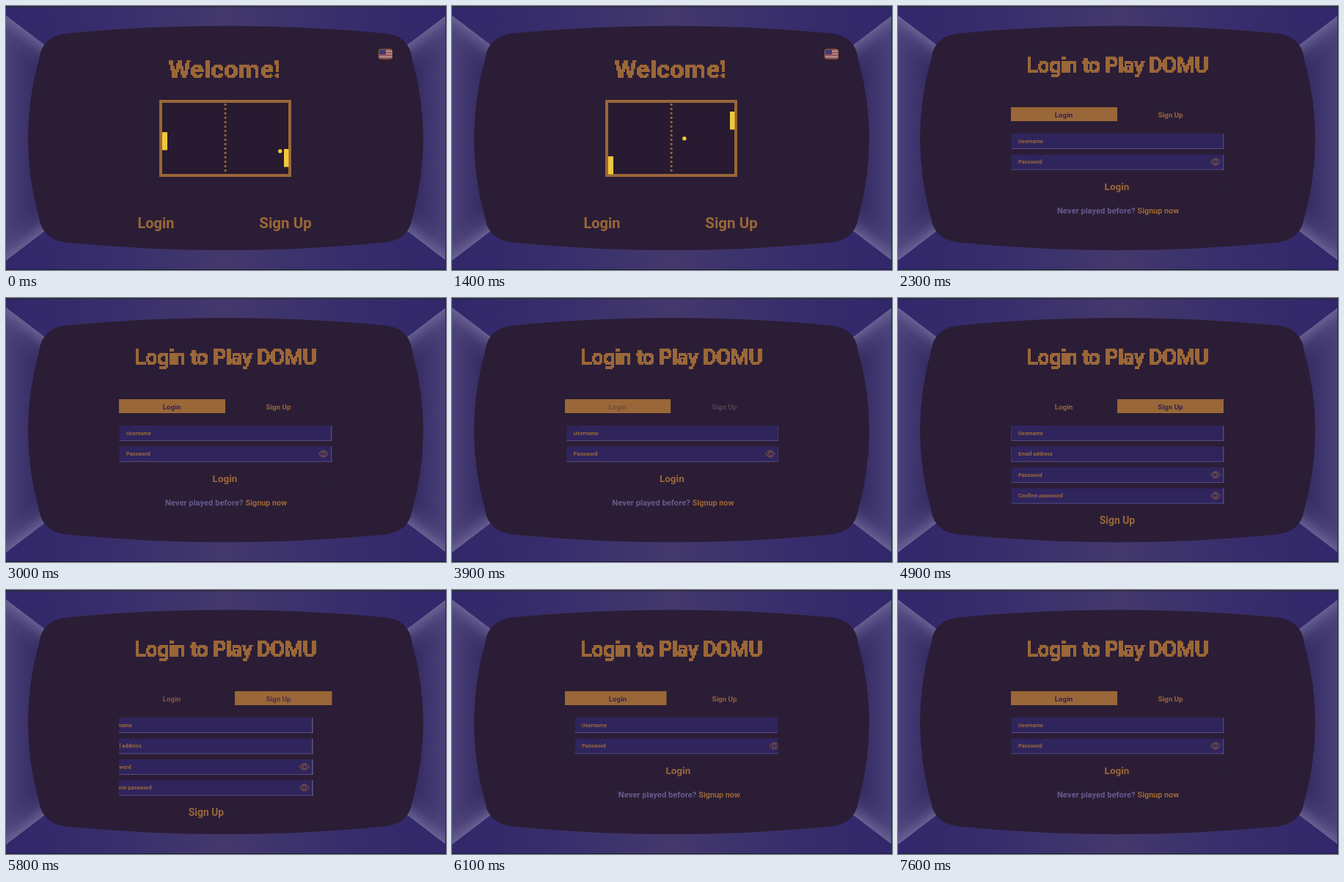
An HTML page with a canvas that plays this animation: 600 px wide and 360 px high, repeating every 7800 ms.

```html
<!DOCTYPE html>
<html lang="en">
<head>
<meta charset="utf-8">
<title>Arcade login</title>
<style>
  html, body { margin: 0; width: 100%; height: 100%; overflow: hidden; background: #2b1d35; }
  canvas { display: block; }
</style>
</head>
<body>
<canvas id="stage" width="600" height="360"></canvas>
<script>
const ctx = document.getElementById('stage').getContext('2d');
const LOOP = 7800, FORM_AT = 2300, TO_SIGNUP = 3700, TO_LOGIN = 5700, SLIDE = 600;
const BROWN = [154, 103, 56], INDIGO = [47, 36, 92];
const brown = rgb(BROWN), indigo = rgb(INDIGO), yellow = '#f0c83c';
const FONT = 'Roboto, "Open Sans", sans-serif';

function rgb(c) { return `rgb(${c.map(Math.round).join(',')})`; }
function mix(a, b, p) { return rgb(a.map((v, i) => v + (b[i] - v) * p)); }

function bezier(x1, y1, x2, y2) {
  const at = (a, b, s) => 3 * a * s * (1 - s) ** 2 + 3 * b * s * s * (1 - s) + s ** 3;
  return x => {
    if (x <= 0) return 0;
    if (x >= 1) return 1;
    let low = 0, high = 1;
    for (let i = 0; i < 24; i++) {
      const mid = (low + high) / 2;
      if (at(x1, x2, mid) < x) low = mid; else high = mid;
    }
    return at(y1, y2, low);
  };
}
const back = bezier(.68, -.55, .265, 1.55);
const ease = bezier(.25, .1, .25, 1);

// Linear interpolation through [time, value] points.
function track(points, t) {
  for (let i = 1; i < points.length; i++) {
    const [t0, a] = points[i - 1], [t1, b] = points[i];
    if (t <= t1) return a + (b - a) * (t - t0) / (t1 - t0);
  }
  return points[points.length - 1][1];
}

function gradient(x0, y0, x1, y1, ...colors) {
  const g = ctx.createLinearGradient(x0, y0, x1, y1);
  colors.forEach((color, i) => g.addColorStop(i / (colors.length - 1), color));
  return g;
}

function rect(x, y, w, h, color) {
  ctx.fillStyle = color;
  ctx.fillRect(x, y, w, h);
}

function text(str, x, y, size, color = brown, align = 'center') {
  ctx.font = `700 ${size}px ${FONT}`;
  ctx.textAlign = align;
  ctx.fillStyle = color;
  ctx.fillText(str, x, y);
}

// Sets a heading in large square pixels by hardening small text and enlarging it.
function pixelHeading(str, centerX, baseline, size, spacing) {
  const unit = 2, small = document.createElement('canvas');
  small.width = 150;
  small.height = 28;
  const c = small.getContext('2d');
  c.font = `700 ${size / unit}px ${FONT}`;
  c.letterSpacing = `${spacing / unit}px`;
  c.textAlign = 'center';
  c.fillStyle = brown;
  c.fillText(str, 75, 20);
  const image = c.getImageData(0, 0, small.width, small.height);
  for (let i = 0; i < image.data.length; i += 4) {
    const solid = image.data[i + 3] > 75;
    BROWN.forEach((v, k) => image.data[i + k] = v);
    image.data[i + 3] = solid ? 255 : 0;
  }
  c.putImageData(image, 0, 0);
  return () => {
    ctx.imageSmoothingEnabled = false;
    ctx.drawImage(small, centerX - 75 * unit, baseline - 20 * unit, 150 * unit, 28 * unit);
  };
}
const welcomeHeading = pixelHeading('Welcome!', 298, 98, 34.5, 0);
const loginHeading = pixelHeading('Login to Play DOMU', 299, 91, 29.5, -.9);

function drawCabinet() {
  rect(0, 0, 600, 360, gradient(0, 0, 600, 0, '#31276a', '#382e6c', '#43396d', '#382e6c', '#31276a'));

  const side = gradient(0, 0, 46, 0, '#4a4179', '#3f356e', '#342a62');
  const glow = gradient(26, 33, 4, 61, 'rgba(118,111,158,.75)', 'rgba(95,87,140,.25)', 'rgba(80,72,128,0)');
  const wedge = new Path2D('M0 13 L54 54 V180.5 H0 Z');
  for (const sx of [1, -1]) for (const sy of [1, -1]) {
    ctx.save();
    ctx.translate(300, 180);
    ctx.scale(sx, sy);
    ctx.translate(-300, -180);
    for (const paint of [side, glow]) {
      ctx.fillStyle = paint;
      ctx.fill(wedge);
    }
    ctx.restore();
  }

  rect(0, 0, 600, 1.5, '#2e2b35');
  rect(0, 359, 600, 1, '#201b30');
  rect(599, 0, 1, 360, '#2a2540');
  ctx.fillStyle = '#2b1d35';
  ctx.fill(new Path2D(`M87 37 Q300 17 513 37 Q550 39 554 73 Q584 180 554 289
    Q549 321 511 323 Q300 343 88 323 Q50 321 45 289 Q15 180 45 73 Q49 39 87 37 Z`));
}

function drawFlag() {
  ctx.save();
  ctx.beginPath();
  ctx.roundRect(508, 59, 19, 13, 2.5);
  ctx.clip();
  for (let i = 0; i < 7; i++) rect(508, 59 + i * 13 / 7, 19, 2, i % 2 ? '#b79a9b' : '#a0545a');
  rect(508, 59, 10, 7, '#3e3a72');
  ctx.restore();
  ctx.strokeStyle = brown;
  ctx.lineWidth = 1;
  ctx.beginPath();
  ctx.roundRect(508.5, 59, 18, 13, 2.5);
  ctx.stroke();
}

function drawWelcome(t) {
  welcomeHeading();
  drawFlag();
  rect(209, 128, 180, 105, brown);
  rect(213, 132, 172, 97, '#281a30');
  for (let y = 133; y < 229; y += 6) rect(297.7, y, 2.8, 2.8, brown);

  const left = track([[0, 184], [860, 217], [1400, 217], [2300, 180]], t);
  const right = track([[0, 207.5], [300, 207.5], [1400, 156.5], [1740, 156.5], [2300, 180]], t);
  rect(213, left - 12, 7, 24.5, yellow);
  rect(379, right - 12.5, 6.5, 24.5, yellow);
  ctx.fillStyle = yellow;
  ctx.beginPath();
  ctx.arc(track([[0, 374], [860, 222.5], [1740, 376], [2600, 222.5]], t),
          track([[0, 198], [860, 217], [1740, 158], [2600, 190]], t), 2.7, 0, 7);
  ctx.fill();

  text('Login', 204.5, 302.5, 20);
  text('Sign Up', 381, 302.5, 20.5);
}

function drawField(x, y, width, label, secret) {
  rect(x, y, width, 21, indigo);
  rect(x, y + 20, width, 1, '#544c80');
  rect(x + width - 1, y, 1, 21, '#77708f');
  text(label, x + 9.5, y + 12.5, 7.4, brown, 'left');
  if (!secret) return;
  ctx.save();
  ctx.translate(x + width - 11.5, y + 10);
  ctx.strokeStyle = brown;
  ctx.lineWidth = .9;
  ctx.stroke(new Path2D('M-6.5 0 Q0 -9 6.5 0 Q0 9 -6.5 0 Z'));
  ctx.beginPath();
  ctx.arc(0, 0, 2.6, 0, 7);
  ctx.stroke();
  ctx.restore();
}

function drawForms(t) {
  const returning = t >= TO_LOGIN;
  const progress = (t - (returning ? TO_LOGIN : TO_SIGNUP)) / SLIDE;
  const along = curve => returning ? 1 - curve(progress) : curve(progress);
  const slide = along(back), tint = along(ease);

  loginHeading();
  ctx.save();
  ctx.beginPath();
  ctx.rect(154, 130, 290.5, 190);
  ctx.clip();

  rect(154 + 145 * slide, 138, 145, 19, brown);
  text('Login', 226, 152, 9.8, mix(INDIGO, BROWN, tint));
  text('Sign Up', 371.5, 152, 9.8, mix(BROWN, INDIGO, tint));

  // A positive offset squeezes both forms equally, as flex items do.
  const offset = -290 * slide;
  const width = 290 - Math.max(0, offset) / 2;
  const login = 154.5 + offset, signup = login + width;
  const middle = login + width / 2;

  drawField(login, 174, width, 'Username');
  drawField(login, 202.5, width, 'Password', true);
  text('Login', middle - 1, 251, 13.5);
  text('Never played before?', middle + 24, 283, 11.2, '#645b8b', 'right');
  text('Signup now', middle + 27, 283, 10.8, brown, 'left');

  ['Username', 'Email address', 'Password', 'Confirm password'].forEach((label, i) =>
    drawField(signup, 174 + 28.5 * i, width, label, i > 1));
  text('Sign Up', signup + width / 2 - .5, 308, 13.9);
  ctx.restore();
}

function frame(now) {
  const t = now % LOOP;
  drawCabinet();
  if (t < FORM_AT) drawWelcome(t); else drawForms(t);
  requestAnimationFrame(() => frame(performance.now()));
}
frame(performance.now());
</script>
</body>
</html>
```
